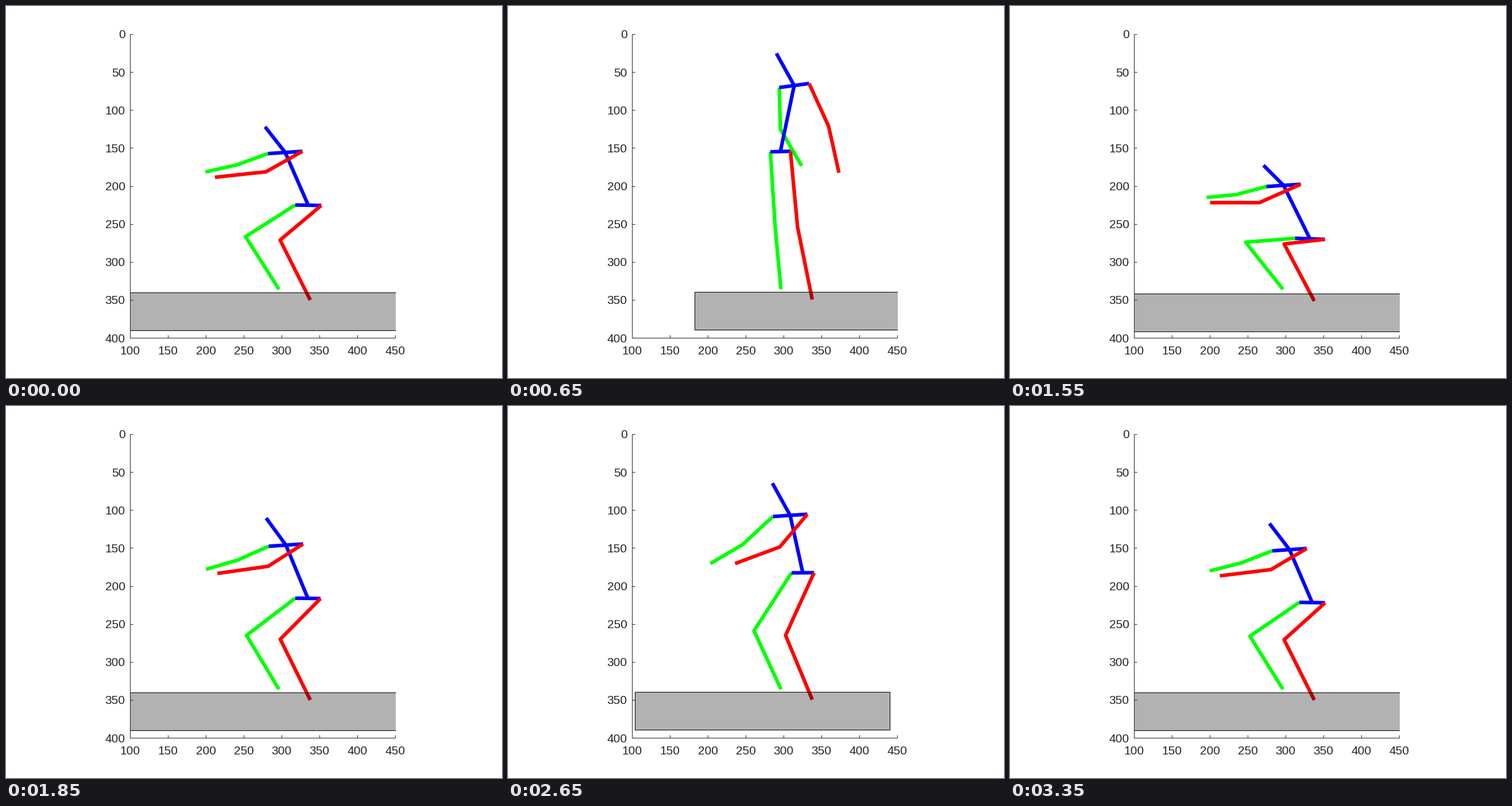
These frames come from a looping animation (864 by 648 pixels, 3.4 s). A matplotlib script:

```python
import numpy as np
import matplotlib.pyplot as plt
from matplotlib.animation import FuncAnimation
from matplotlib.patches import Rectangle

W, H, DPI = 864, 648, 150
FRAMES, STEP = 68, 50
LEFT, RIGHT, TOP, BOTTOM = 216, 678, 49, 578
INK = "0.15"
SCALE = (RIGHT - LEFT) / 350


def smooth(keys, v, at):
    """Monotone cubic through the points (keys, v), read at the places at."""
    keys, v = np.array(keys, float), np.array(v, float)
    h = np.diff(keys)
    d = np.diff(v) / h
    m = np.zeros_like(v)
    for i in range(1, len(v) - 1):
        a, b = d[i - 1], d[i]
        if a * b > 0:
            w1, w2 = 2 * h[i] + h[i - 1], h[i] + 2 * h[i - 1]
            m[i] = (w1 + w2) / (w1 / a + w2 / b)
    m[0], m[-1] = 1.2 * d[0], 1.2 * d[-1]
    k = np.clip(np.searchsorted(keys, at, side="right") - 1, 0, len(h) - 1)
    s = (at - keys[k]) / h[k]
    return ((1 + 2 * s) * (1 - s) ** 2 * v[k] + s * (1 - s) ** 2 * h[k] * m[k]
            + s * s * (3 - 2 * s) * v[k + 1] + s * s * (s - 1) * h[k] * m[k + 1])


# Squat depth over time: 0 is standing, 1 is a deep squat
time = np.maximum(np.arange(FRAMES) - 1, 0)
depth = smooth([0, 12, 14, 21, 27.5, 30, 43, 45, 52, 60, 66],
               [0.61, 0, -0.03, 0.45, 1.06, 1, 0, -0.03, 0.25, 1.06, 0.58], time)


def joint(*pts):
    """Path of a joint, given where it is standing, half down, crouched, deep."""
    x, y = (smooth([0, 0.25, 0.6, 1], c, depth) for c in zip(*pts))
    return x + 0.5 + 1j * (y + 0.5)


head = joint((467, 82), (460, 134), (451, 208), (441, 277))
neck = joint((498, 138), (491, 190), (486, 253), (476, 312))
pelvis = joint((474, 253), (513, 290), (526, 345), (522, 405))
l_elbow = joint((474, 214), (408, 241), (402, 275), (394, 328))
l_hand = joint((485, 278), (352, 274), (347, 288), (342, 333))
r_elbow = joint((558, 209), (473, 245), (453, 287), (434, 342))
r_hand = joint((576, 290), (395, 274), (364, 297), (348, 342))
l_knee = joint((465, 386), (428, 391), (417, 401), (410, 411))
r_knee = joint((504, 385), (483, 399), (477, 407), (477, 414))

# The left hand hangs behind, then in front, on alternate stands
upright = np.clip(1 - depth / 0.25, 0, 1)
l_hand = l_hand + 26 * upright * np.cos(np.pi * (time - 12) / 31)

girdle = 30 - 4 * upright - 1j * (2 + 1.5 * upright)
hip = 17.5 + 8.5 * depth + 1j * (1.5 * depth - 0.5)
l_foot = 475.5 + 493.5j + 0 * depth
r_foot = 530 + 1j * (511.3 + 2.5 * depth ** 2)

l_shoulder, r_shoulder = neck - girdle, neck + girdle
l_hip, r_hip = pelvis - hip, pelvis + hip

LIMBS = [("#00ff00", (l_shoulder, l_elbow, l_hand)),
         ("#00ff00", (l_hip, l_knee, l_foot)),
         ("#0000ff", (head, neck, pelvis)),
         ("#0000ff", (l_shoulder, r_shoulder)),
         ("#0000ff", (l_hip, r_hip)),
         ("#ff0000", (r_shoulder, r_elbow, r_hand)),
         ("#ff0000", (r_hip, r_knee, r_foot))]
body = np.concatenate([limb for _, limb in LIMBS])

fig = plt.figure(figsize=(W / DPI, H / DPI), dpi=DPI, facecolor="white")
ax = fig.add_axes([0, 0, 1, 1])
ax.set_xlim(0, W)
ax.set_ylim(H, 0)
ax.axis("off")

plot_area = Rectangle((LEFT, TOP), RIGHT + 1 - LEFT, BOTTOM - TOP,
                      transform=ax.transData)


def rule(x, y):
    ax.plot(x, y, color=INK, lw=0.5, solid_capstyle="butt", zorder=6)


def label(x, y, value, ha):
    ax.text(x, y, str(value), ha=ha, va="baseline", color=INK,
            fontsize=10, family="Liberation Sans")


rule([LEFT, LEFT], [TOP, BOTTOM])
rule([LEFT, RIGHT], [BOTTOM, BOTTOM])
for i, x in enumerate(np.linspace(LEFT, RIGHT, 8)):
    rule([x, x], [BOTTOM, BOTTOM - 5])
    label(x, 606.7, 100 + 50 * i, "center")
for i, y in enumerate(np.linspace(TOP, BOTTOM, 9)):
    rule([LEFT, LEFT + 5], [y, y])
    label(207.7, y + 7.5, 50 * i, "right")

lines = []
for color, _ in LIMBS:
    line, = ax.plot([], [], color=color, lw=3, zorder=3,
                    solid_capstyle="butt", solid_joinstyle="round")
    line.set_clip_path(plot_area)
    lines.append(line)

ground = Rectangle((0, 0), 1, 50 * SCALE, facecolor=(0, 0, 0, 0.3),
                   edgecolor="black", lw=0.5, zorder=5)
ax.add_patch(ground)
ground.set_clip_path(plot_area)


def draw(k):
    for line, (_, limb) in zip(lines, LIMBS):
        pts = np.array([j[k] for j in limb])
        line.set_data(pts.real, pts.imag)
    # The floor reaches 100 units past the body on either side
    x = body[:, k].real
    ground.set_xy((x.min() - 100 * SCALE, r_foot[k].imag - 10 * SCALE))
    ground.set_width(np.ptp(x) + 200 * SCALE)
    return lines + [ground]


anim = FuncAnimation(fig, draw, frames=FRAMES, interval=STEP,
                     repeat=True, repeat_delay=0)
plt.show()
```
